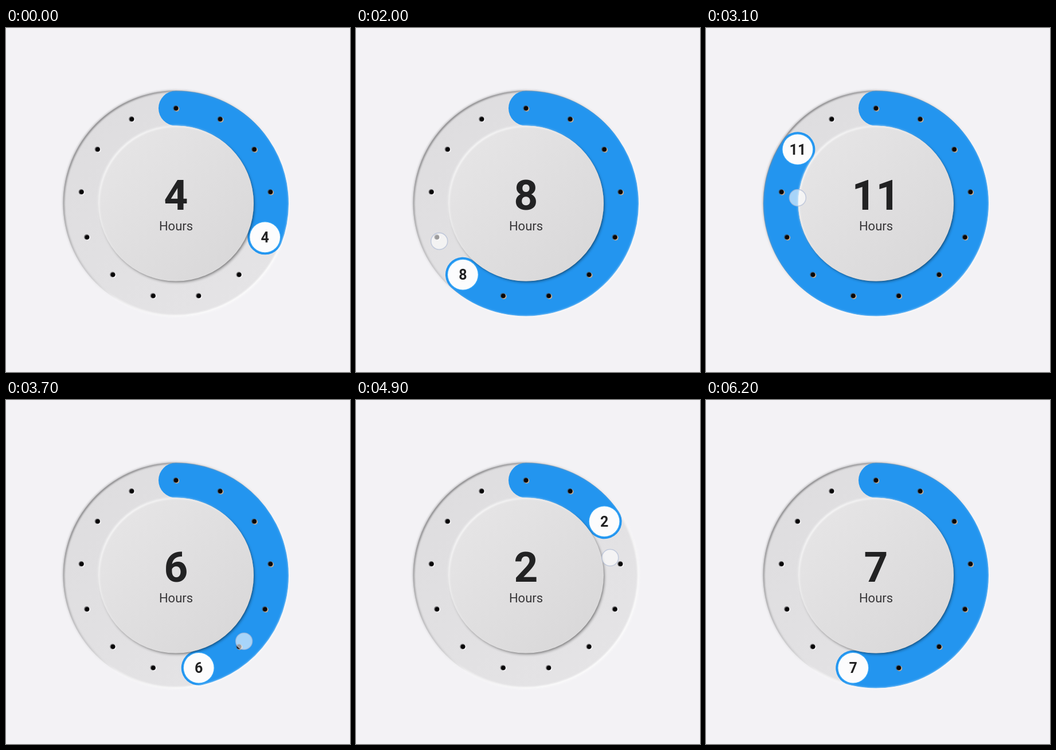
These frames come from a looping animation (600 px wide and 600 px high, 6.3 s). An HTML page:

```html
<!DOCTYPE html>
<html lang="en">
<head>
<meta charset="utf-8">
<title>Hour dial</title>
<style>
  html, body { margin: 0; width: 100%; height: 100%; overflow: hidden; background: #f3f2f5; }
  svg { display: block; width: 100vw; height: 100vh; }
  text { font-family: Roboto, sans-serif; text-anchor: middle; fill: #222223; }
  .bold { font-weight: 700; }
</style>
</head>
<body>
<svg viewBox="0 0 600 600">
  <defs>
    <linearGradient id="ringFill" x1="0" y1="0" x2="1" y2="1">
      <stop offset=".1" stop-color="#dedddf"/>
      <stop offset=".9" stop-color="#e5e4e6"/>
    </linearGradient>
    <linearGradient id="ringEdge" x1=".1" y1=".1" x2=".9" y2=".9">
      <stop offset="0" stop-color="#858486"/>
      <stop offset=".48" stop-color="#b4b4b6" stop-opacity=".35"/>
      <stop offset=".6" stop-color="#fff" stop-opacity=".45"/>
      <stop offset="1" stop-color="#fff" stop-opacity=".95"/>
    </linearGradient>
    <linearGradient id="discFill" x1=".1" y1=".1" x2=".9" y2=".9">
      <stop offset="0" stop-color="#e6e5e6"/>
      <stop offset="1" stop-color="#d9d8d9"/>
    </linearGradient>
    <linearGradient id="discEdge" x1=".1" y1=".1" x2=".9" y2=".9">
      <stop offset="0" stop-color="#fff" stop-opacity=".9"/>
      <stop offset=".5" stop-color="#fff" stop-opacity="0"/>
    </linearGradient>
    <filter id="soft" x="-20%" y="-20%" width="140%" height="140%"><feGaussianBlur stdDeviation="1.5"/></filter>
    <filter id="shade" x="-20%" y="-20%" width="140%" height="140%"><feGaussianBlur stdDeviation="2.4"/></filter>
    <filter id="dotSoft" x="-60%" y="-60%" width="220%" height="220%"><feGaussianBlur stdDeviation=".7"/></filter>
    <clipPath id="ringClip"><circle cx="296.5" cy="306" r="197"/></clipPath>
  </defs>

  <rect width="600" height="600" fill="#f3f2f5"/>
  <circle cx="296.5" cy="306" r="197" fill="url(#ringFill)"/>
  <g clip-path="url(#ringClip)">
    <circle cx="296.5" cy="306" r="197" fill="none" stroke="url(#ringEdge)" stroke-width="5" filter="url(#soft)"/>
    <path id="arc" fill="none" stroke="#2395ef" stroke-width="61" stroke-linecap="round"/>
  </g>
  <circle cx="296.5" cy="306" r="197" fill="none" stroke="url(#ringEdge)" stroke-width="2.4" opacity=".65" filter="url(#soft)"/>

  <circle cx="298.5" cy="308.5" r="134.5" fill="#000" opacity=".5" filter="url(#shade)"/>
  <circle cx="296.5" cy="306" r="135.5" fill="url(#discFill)"/>
  <circle cx="296.5" cy="306" r="135" fill="none" stroke="url(#discEdge)" stroke-width="3" filter="url(#soft)"/>

  <g id="dots"></g>
  <g id="knob">
    <circle r="27.5" fill="#3aa8f8"/>
    <circle r="26.3" fill="#fcfcfd"/>
    <text id="small" class="bold" y="8.8" font-size="25"></text>
  </g>
  <text id="big" class="bold" x="296.5" y="316.5" font-size="73"></text>
  <text id="unit" x="296.5" y="352.5" font-size="22" style="fill:#373638"></text>
  <circle id="touch" r="14.5" fill="#fff" fill-opacity=".6" stroke="#a9b6d2" stroke-opacity=".6" stroke-width="1.6"/>
</svg>

<script>
const $ = id => document.getElementById(id);
const LOOP = 6300, STEP = 100, LAG = 100, SLOTS = 13;
const CX = 296.5, CY = 306, R = 166;

// time, finger position in hours, finger distance from the centre
const drag = [
  [700, 4, 166], [1000, 4.5, 170], [1300, 5.8, 175], [1400, 6.26, 176],
  [2000, 8.9, 165], [2500, 11.52, 159], [2700, 12, 156], [2850, 11.9, 150],
  [3000, 10.7, 140], [3100, 9.9, 137], [3400, 8.6, 148], [3600, 6.1, 162],
  [3700, 4.84, 165], [4100, 1.2, 155], [4300, 1, 152], [4600, 1.1, 150],
  [4800, 2.3, 150], [4900, 2.82, 150], [5500, 6.1, 164], [5800, 7, 168]
];

function finger(t) {
  const n = drag.length;
  if (t <= drag[0][0]) return drag[0];
  for (let i = 1; i < n; i++) {
    const a = drag[i - 1], b = drag[i];
    if (t <= b[0]) {
      const k = (t - a[0]) / (b[0] - a[0]);
      return a.map((v, j) => v + (b[j] - v) * k);
    }
  }
  return drag[n - 1];
}

function at(hour, r = R) {
  const a = hour * 2 * Math.PI / SLOTS;
  return [CX + r * Math.sin(a), CY - r * Math.cos(a)];
}

const move = (el, [x, y]) => el.setAttribute("transform", `translate(${x.toFixed(2)} ${y.toFixed(2)})`);
const ramp = (t, a, b) => Math.min(1, Math.max(0, (t - a) / (b - a)));

const dots = Array.from({ length: SLOTS }, (_, i) => {
  const g = document.createElementNS("http://www.w3.org/2000/svg", "g");
  g.innerHTML = `<circle cx="1.2" cy="1" r="4.7" filter="url(#dotSoft)"/>
    <circle cx="-.5" cy="-.2" r="4.8" fill="#48474a" opacity=".65" filter="url(#dotSoft)"/>
    <circle cx=".1" cy=".1" r="3.8" fill="#080708" filter="url(#dotSoft)"/>`;
  move(g, at(i));
  $("dots").append(g);
  return g;
});

function draw(t) {
  const hour = Math.round(finger(t - LAG)[1]);
  const [x0, y0] = at(0), [x1, y1] = at(hour);
  $("arc").setAttribute("d", `M${x0} ${y0}A${R} ${R} 0 ${hour > SLOTS / 2 ? 1 : 0} 1 ${x1} ${y1}`);
  dots.forEach((g, i) => {
    g.firstChild.setAttribute("fill", i <= hour ? "#c3aa91" : "#f4f3f5");
    g.style.display = i === hour ? "none" : "";
  });
  move($("knob"), [x1, y1]);
  $("small").textContent = $("big").textContent = hour;
  $("unit").textContent = hour === 1 ? "Hour" : "Hours";

  const [, p, r] = finger(t);
  move($("touch"), at(p, r));
  $("touch").setAttribute("opacity", ramp(t, 600, 800) * (1 - ramp(t, 5900, 6100)));
}

function tick() {
  const t = performance.now() % LOOP;
  draw(Math.floor(t / STEP) * STEP);
  requestAnimationFrame(tick);
}
tick();
</script>
</body>
</html>
```
